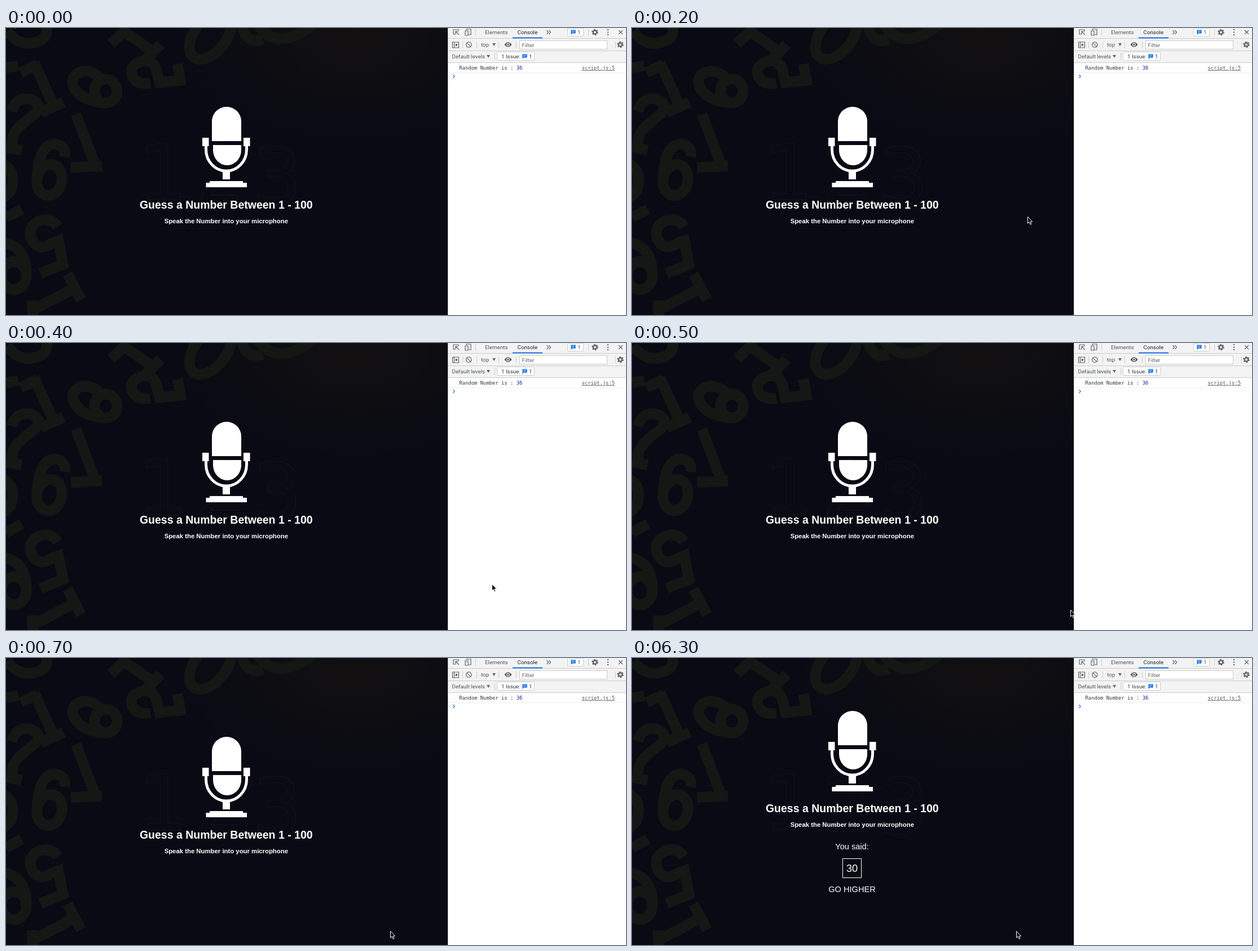
An HTML page for the animation above (8 s loop, 1099 by 510 pixels).

```html
<!DOCTYPE html>
<html lang="en">
<head>
<meta charset="utf-8">
<title>Guess a Number</title>
<style>
  html, body { margin: 0; width: 100%; height: 100%; overflow: hidden; background: #090a14; }
  svg { display: block; width: 1099px; height: 510px; }
  .page { font-family: "Liberation Sans", Arial, sans-serif; font-size: 14.6px; fill: #fff; text-anchor: middle; }
  .page .bold { font-weight: bold; }
  .digits { fill: none; stroke: #141714; stroke-width: 19; }
  .ghost { fill: none; stroke: #141617; stroke-width: 1; font: 138px "DejaVu Sans", sans-serif; }
  .tools { font-family: Roboto, "Open Sans", sans-serif; font-size: 9.8px; fill: #50545a; }
  .tools .line { stroke: #ccc; fill: none; }
  .tools .icon { stroke: #5f6368; fill: none; stroke-width: 1.2; }
  .log { font-family: "DejaVu Sans Mono", monospace; font-size: 8.86px; fill: #303942; white-space: pre; }
</style>
</head>
<body>
<svg viewBox="0 0 1099 510">
  <defs>
    <radialGradient id="glow">
      <stop offset="0" stop-color="#15120f" stop-opacity=".75"/>
      <stop offset="1" stop-color="#15120f" stop-opacity="0"/>
    </radialGradient>
    <g id="gear">
      <circle r="3.2" fill="none" stroke="#5f6368" stroke-width="2.4"/>
      <circle r="4.9" fill="none" stroke="#5f6368" stroke-width="1.8" stroke-dasharray="2.5 2.63"/>
    </g>
    <path id="bubble" d="M0 0H9V7H3L0 9.5Z M2 2.2H7 M2 4.5H5.5" fill="#1a73e8" stroke="#fff" stroke-width=".7"/>
    <path id="arrow" d="M0 0H6L3 5Z" fill="#5f6368"/>
  </defs>

  <rect width="784" height="510" fill="#090a14"/>
  <ellipse cx="620" cy="20" rx="330" ry="190" fill="url(#glow)"/>
  <g class="digits">
    <path d="M2 5Q25 38 62 22Q75 14 72-4"/>
    <path d="M0 71L22 67M26 79L56 65M50 62L86 142M62 150L102 132"/>
    <path d="M10 148Q18 122 42 126Q66 134 52 152Q28 170 18 182Q8 195 12 214M0 212L28 217"/>
    <ellipse cx="177" cy="112" rx="20" ry="21"/>
    <path d="M168 90C140 62 106 84 122 108C130 122 150 132 177 133"/>
    <path d="M304 64L309 93L272 97L266 72Q258 54 238 60Q217 68 224 86Q232 102 256 98"/>
    <path d="M186 28L212 4M206 4L262 43M247 57L274 29"/>
    <ellipse cx="362" cy="14" rx="28" ry="48" transform="rotate(38 362 14)"/>
    <path d="M418-2Q428 30 455 20M446-6Q480 44 545-6"/>
    <path d="M124 153L159 246M115 248L170 245"/>
    <ellipse cx="77" cy="270" rx="22" ry="28" transform="rotate(12 77 270)"/>
    <path d="M55 268Q58 206 88 206Q107 210 104 229"/>
    <path d="M-5 242Q20 255 8 290L-5 302M0 337L28 322"/>
    <path d="M92 353Q80 336 58 343Q36 355 46 377Q58 398 82 382L93 378L101 420L61 436"/>
    <ellipse cx="14" cy="440" rx="22" ry="25"/>
    <path d="M36 440Q38 390-4 381"/>
    <path d="M46 484L48 515M46 502L122 462M109 437L133 483"/>
  </g>
  <g class="ghost">
    <text x="234" y="305">1</text><text x="337" y="308">2</text><text x="437" y="312">3</text>
  </g>

  <g class="page">
    <g id="mic">
      <path d="M365 201V166A26 26 0 0 1 417 166V201ZM367 208H417V217A25 27 0 0 1 367 217ZM348 195H359.500V210H348ZM421 195H432.500V210H421ZM384 254H397V269H384ZM361 272H420V275H427V283H354.500V275H361Z"/>
      <path d="M354.500 209V216A36 38 0 0 0 426.500 216V209" fill="none" stroke="#fff" stroke-width="5"/>
    </g>
    <g id="titles" class="bold">
      <text x="390.300" y="321" font-size="19.500">Guess a Number Between 1 - 100</text>
      <text x="390.300" y="347" font-size="11.350">Speak the Number into your microphone</text>
    </g>
    <g id="reply">
      <text x="390" y="340">You said:</text>
      <rect id="box" y="356.500" height="34" fill="none" stroke="#fff"/>
      <text id="said" x="390" y="380" font-size="18.200"></text>
      <text id="hint" x="390" y="416"></text>
    </g>
  </g>

  <g class="tools">
    <rect x="784" width="315" height="510" fill="#fefefe"/>
    <rect x="784" width="315" height="61" fill="#f3f3f3"/>
    <path class="line" d="M783.500 0V510M784 18.500H1099M784 40.500H1099M784 61.500H1099M832.500 2V14M1032.500 2V14M809.500 24V36M834.500 24V36M873.500 24V36M904.500 24V36M1080.500 24V36M866.500 44V57"/>
    <path class="line" d="M784 79.500H1099" style="stroke:#f0f0f0"/>
    <rect x="898" y="16.500" width="53" height="2" fill="#1a73e8"/>

    <path class="icon" d="M798 11H793V3H802V6M797 6L803 12M797 10V6H801"/>
    <path class="icon" d="M816 4V2H824V12H820M814 5H819V13H814Z"/>
    <text x="849" y="11">Elements</text>
    <text x="906.500" y="11" fill="#222">Console</text>
    <path class="icon" d="M958.500 4L961.500 7.500L958.500 11M962.500 4L965.500 7.500L962.500 11"/>
    <rect class="line" x="995.500" y=".5" width="28" height="14" rx="1" style="fill:#fff"/>
    <use href="#bubble" x="1001" y="3"/>
    <text x="1013" y="11">1</text>
    <use href="#gear" x="1044" y="7.500"/>
    <path d="M1066 2h2v2h-2zM1066 6.500h2v2h-2zM1066 11h2v2h-2z"/>
    <path class="icon" d="M1086 4L1093 11M1093 4L1086 11"/>

    <path class="icon" d="M791.500 25H802.500V35H791.500ZM794.500 25V35"/>
    <path d="M797 27.500L801 30L797 32.500Z"/>
    <path class="icon" d="M816.800 26.200L823.700 33.200"/>
    <circle class="icon" cx="820.300" cy="29.700" r="4.800"/>
    <text x="842" y="33">top</text>
    <use href="#arrow" x="862" y="27"/>
    <path d="M883.500 29.500Q890 21 896.500 29.500Q890 38 883.500 29.500Z"/>
    <circle cx="890" cy="29.500" r="2.300" fill="#5f6368" stroke="#f3f3f3" stroke-width="1.200"/>
    <rect class="line" x="910.500" y="22.500" width="155" height="15" style="fill:#fff"/>
    <text x="914.500" y="33.500" fill="#666">Filter</text>
    <use href="#gear" x="1089" y="29.500"/>

    <text x="790.500" y="54">Default levels</text>
    <use href="#arrow" x="852" y="48"/>
    <rect class="line" x="870.500" y="42.500" width="66" height="15" rx="1" style="fill:#fff"/>
    <text x="878" y="54" fill="#303942">1 Issue:</text>
    <use href="#bubble" x="915" y="46"/>
    <text x="927" y="54" fill="#303942">1</text>
  </g>
  <g class="log">
    <text x="803.500" y="74">Random Number is : <tspan fill="#1a1aa6">36</tspan></text>
    <text x="1020.500" y="74" fill="#545454" text-decoration="underline">script.js:5</text>
    <path d="M792.300 83L795.300 86L792.300 89" fill="none" stroke="#367cf1" stroke-width="1.300"/>
  </g>

  <path id="cursor" d="M.5.5V12.200L3.200 9.700L5.200 14.200L7 13.400L5.100 9.100H8.600Z" fill="#000" stroke="#fff" stroke-width="1"/>
</svg>
<script>
  const $ = id => document.getElementById(id);
  const LOOP = 8000, STEP = 100;
  // pointer position, sampled every STEP ms
  const trail = [[10, -14], [420, 190], [701, 335], [807, 373], [861, 428], [777, 474], [716, 489], [681, 485]];
  const replies = [
    { at: 3100, said: "my name is Kaveso", hint: "Tha is not a valid number!!", width: 171 },
    { at: 6300, said: "30", hint: "GO HIGHER", width: 33 }
  ];

  function draw(t) {
    const step = Math.min(Math.floor(t / STEP), trail.length - 1);
    $("cursor").setAttribute("transform", `translate(${trail[step]})`);

    const reply = replies.filter(r => t >= r.at).pop();
    $("reply").style.display = reply ? "" : "none";
    $("mic").setAttribute("transform", `translate(0 ${reply ? -46 : 0})`);
    $("titles").setAttribute("transform", `translate(0 ${reply ? -47 : 0})`);
    if (!reply) return;
    $("said").textContent = reply.said;
    $("hint").textContent = reply.hint;
    $("box").setAttribute("x", 390 - reply.width / 2);
    $("box").setAttribute("width", reply.width);
  }

  const start = performance.now();
  function tick() {
    draw((performance.now() - start) % LOOP);
    requestAnimationFrame(tick);
  }
  tick();
</script>
</body>
</html>
```
